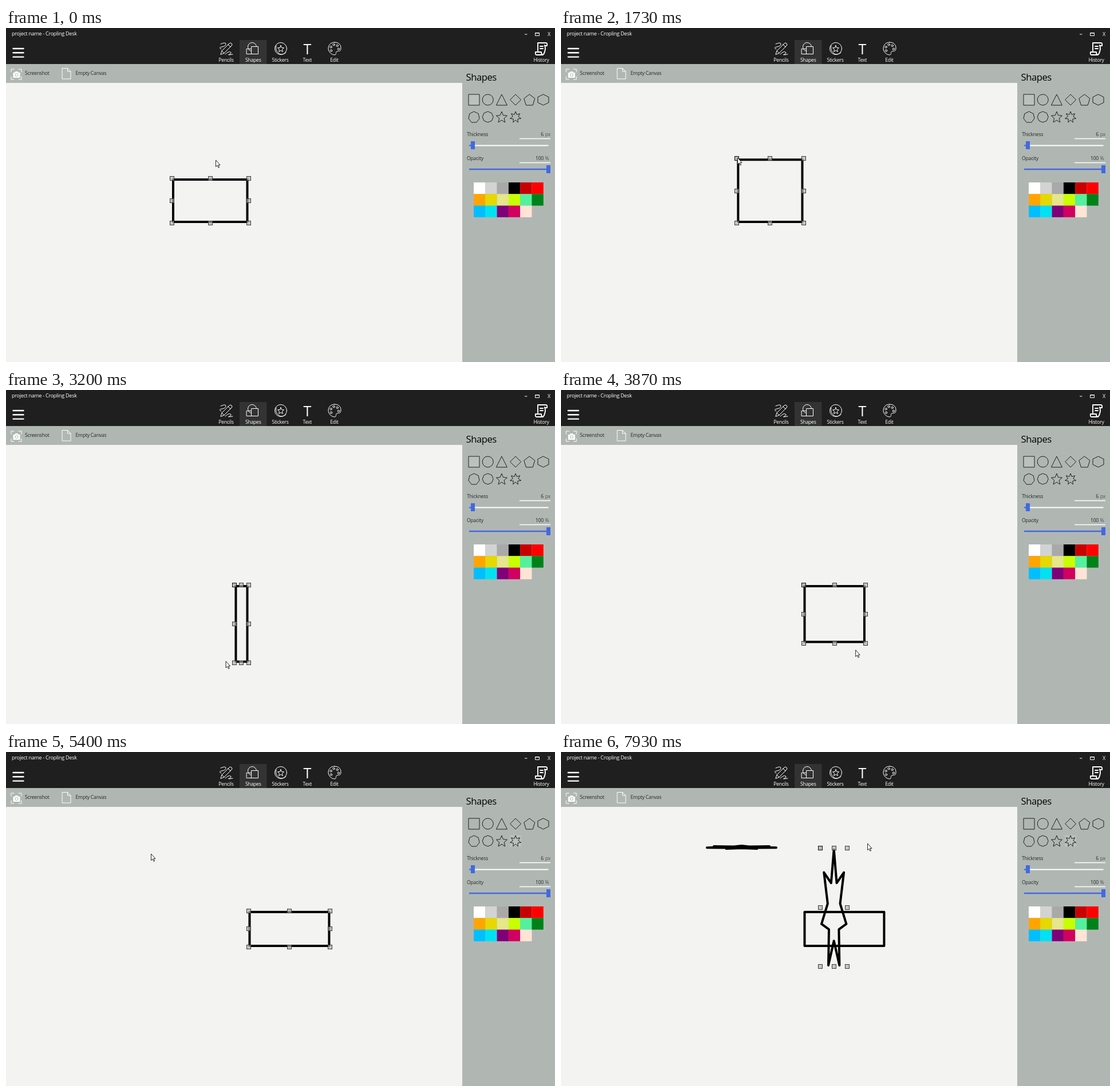
These frames come from a looping animation (959x584 px, 8 s). An HTML page:

```html
<!DOCTYPE html>
<html lang="en">
<head>
<meta charset="utf-8">
<title>Shapes</title>
<style>
  html, body { margin: 0; width: 100%; height: 100%; overflow: hidden; background: #f3f3f2; }
  svg { display: block; }
  text { font-family: "Open Sans", "Noto Sans", sans-serif; font-size: 8.7px; letter-spacing: -.03em; fill: #262a28; }
  .light text { fill: #fff; }
  .line { fill: none; stroke: #fff; stroke-width: 1; stroke-linejoin: round; stroke-linecap: round; }
  .tool { fill: none; stroke: #1d1f1e; stroke-width: 1; }
  .ink { fill: none; stroke: #000; stroke-width: 4; stroke-linejoin: round; }
  .handle { fill: #b4b4b4; fill-opacity: .7; stroke: #3c3c3c; stroke-width: 1; }
  .handle.hot { fill: #a0a0a0; stroke: #111; }
</style>
</head>
<body>
<svg width="959" height="584" viewBox="0 0 959 584">
  <path d="M0 63H959V584H797V96H0z" fill="#b0b7b3"/>
  <rect width="959" height="63" fill="#1f1f1f"/>
  <rect x="408" y="21" width="47.500" height="42" fill="#333"/>

  <g class="light">
    <text x="10" y="13" style="font-size:9px">project name - Cropling Desk</text>
    <text x="946" y="14" style="font-size:9px">X</text>
    <text x="519.500" y="45.500" style="font-size:25px">T</text>
    <g id="tabs" text-anchor="middle"></g>
  </g>
  <g id="icons" class="line">
    <path d="M12.500 36H30.500m-18 7.300h18m-18 7.300h18" stroke-width="2.400"/>
    <path d="M906.500 11H910M925 8.500H931.500V13.500H925zM925 9H931.500"/>
    <path d="M375 46l2-6 13-13q2-2 4 0t0 4l-13 13zM377 40l4 4M388 29l4 4M375 28q9-4 9 0t-7 5-1 4M383 46q6-6 9-4t-2 4 6 0"/>
    <circle cx="430" cy="33" r="7.500"/>
    <path d="M420.500 36.500H432V45.500H420.500z"/>
    <path d="M429 32.500H440.500V45.500H429z" fill="#333"/>
    <circle cx="480" cy="36" r="10.500"/>
    <path d="M472 31q-2 8 4 13t13-1"/>
    <path d="M574 25c-8 0-11 6-11 11s5 11 11 11c4 0 1-5 4-6s7 1 7-6-5-10-11-10z"/>
    <path d="M929 26h14q3 0 2 5h-4M929 26v14M941 30q2 6 0 11-1 6-5 6h-9q-3 0-2-5h10q0 5 3 5M933 32h5M933 36h5" stroke-width="1.900"/>
    <path d="M9 77V72H14M22 72H27V77M27 85V90H22M14 90H9V85M98.500 70.500H107.500L113 76V89H98.500zM107.500 70.500V76H113"/>
  </g>
  <path d="M12.500 78H15L16.500 76H20.500L22 78H24.500V87H12.500z" fill="#fff"/>
  <circle cx="18.500" cy="82" r="2.500" fill="none" stroke="#b0b7b3"/>

  <text x="33" y="82">Screenshot</text>
  <text x="121.500" y="82">Empty Canvas</text>
  <text x="803.500" y="91.500" style="font-size:16.700px;fill:#000">Shapes</text>
  <text x="805" y="188.500">Thickness</text>
  <text x="805" y="230.500">Opacity</text>
  <g text-anchor="end">
    <text x="939" y="188.500">6</text>
    <text x="951" y="188.500" style="fill:#555">px</text>
    <text x="939" y="230.500">100</text>
    <text x="948.500" y="230.500" style="fill:#555">%</text>
  </g>
  <path d="M897 193.500H951M897 235.500H951" stroke="#fff" stroke-width="1.300"/>
  <path d="M809 205.500H947.500" stroke="#fff" stroke-width="2"/>
  <path d="M809 205.500H813M809 247H946" stroke="#4169e1" stroke-width="2.400"/>
  <path d="M812 198H819V212H812zM944 240H951V254H944z" fill="#4169e1"/>

  <rect id="glow" width="20" height="20" fill="#fff" fill-opacity=".14"/>
  <g id="tools" class="tool"></g>
  <g id="swatches"></g>

  <path id="box" class="ink"/>
  <path id="star" class="ink"/>
  <path id="flat" class="ink"/>
  <g id="handles"></g>
  <path id="cursor" d="M.5 0V11.500L3.200 9.200L5 13.200L6.600 12.500L4.900 8.500H8z" fill="#fff" stroke="#111" stroke-width=".9"/>
</svg>
<script>
const $ = id => document.getElementById(id);
const add = (id, name, attrs) => {
  const el = document.createElementNS('http://www.w3.org/2000/svg', name);
  for (const k in attrs) el.setAttribute(k, attrs[k]);
  return $(id).appendChild(el);
};

// Regular polygon, or a star when inner < 1, stretched to fill a box.
function polygon(n, inner, [x0, y0, x1, y1]) {
  const count = inner < 1 ? 2 * n : n;
  const pts = Array.from({ length: count }, (_, i) => {
    const a = 2 * Math.PI * i / count, r = i % 2 ? inner : 1;
    return [r * Math.sin(a), -r * Math.cos(a)];
  });
  const xs = pts.map(p => p[0]), ys = pts.map(p => p[1]);
  const fit = (v, all, a, b) => {
    const lo = Math.min(...all);
    return (a + (v - lo) / (Math.max(...all) - lo) * (b - a)).toFixed(2);
  };
  return 'M' + pts.map(([x, y]) => fit(x, xs, x0, x1) + ' ' + fit(y, ys, y0, y1)).join('L') + 'z';
}
const rectPath = ([x0, y0, x1, y1]) => `M${x0} ${y0}H${x1}V${y1}H${x0}z`;

// Tabs, small icons and side panel
['Pencils', 'Shapes', 'Stickers', 'Text', 'Edit', 'History'].forEach((name, i) => {
  add('tabs', 'text', { x: i < 5 ? 384.5 + 47.25 * i : 935, y: 59 }).textContent = name;
});
add('icons', 'path', { d: polygon(5, .45, [474.5, 30.5, 485.5, 41.5]) });
for (let i = 0; i < 5; i++) {
  const a = 2.6 + i * .95;
  add('icons', 'circle', { cx: 574 + 7 * Math.cos(a), cy: 36 + 7 * Math.sin(a), r: 1.7 });
}
const slot = i => [808 + i % 6 * 24.2, 116 + Math.floor(i / 6) * 30];
const cell = i => {
  const [x, y] = slot(i);
  return [x, y, x + 19, y + 19];
};
const tool = d => add('tools', 'path', { d });
tool(rectPath(cell(0)));
add('tools', 'circle', { cx: 841.7, cy: 125.5, r: 9.5 });
for (let n = 3; n < 9; n++) tool(polygon(n, 1, cell(n - 1)));
tool(polygon(5, .45, cell(8)));
tool(polygon(7, .5, cell(9)));

const colors = 'white lightgray darkgray black #c80000 red orange #e6d800 #e6e68a #c8ff00 ' +
  '#54f09e #008219 deepskyblue #00e1f2 #800078 #d2005f #ffe4d6';
colors.split(' ').forEach((fill, i) => add('swatches', 'rect', {
  x: 817 + i % 6 * 20.3, y: 270 + Math.floor(i / 6) * 20.3, width: 20.3, height: 20.3, fill
}));
const handles = Array.from({ length: 8 }, () =>
  add('handles', 'rect', { class: 'handle', width: 7, height: 7 }));

// Pointer moves: begin, end, then where it comes to rest.
const moves = [
  [0, 333, 297, 274], [467, 867, 290, 263], [1230, 2000, 315, 213], [2067, 2452, 437, 204],
  [4360, 4667, 868, 148], [4667, 4850, 892, 154], [4850, 5400, 253, 178],
  [5400, 5533, 453, 374], [5600, 6400, 253, 173], [6400, 6533, 263, 170],
  [6533, 6667, 378, 162], [6870, 7333, 253, 173], [7400, 7885, 380, 198], [7885, 7933, 535, 160]
];
const ORBIT = 2452, RELEASE = 4340, LAG = 15;
const anchor = [423.5, 341];

// Speeding up clockwise round the fixed corner of the rectangle.
function orbit(t) {
  const u = (Math.min(t, RELEASE) - ORBIT) / (RELEASE - ORBIT);
  const a = (-85.4 + 778 * u ** 1.524) * Math.PI / 180;
  return [anchor[0] + 161 * Math.cos(a), anchor[1] + 137.5 * Math.sin(a)];
}
function pointer(t) {
  let pos = [366, 231];
  for (const [begin, end, x, y] of moves) {
    if (t > ORBIT && begin > ORBIT && begin < 4400) pos = orbit(t);
    if (t <= begin) break;
    const u = Math.min(1, (t - begin) / (end - begin)), h = u * u * (3 - 2 * u);
    pos = [pos[0] + (x - pos[0]) * h, pos[1] + (y - pos[1]) * h];
  }
  return pos;
}

const clamp = (v, lo, hi) => Math.min(hi, Math.max(lo, v));
const span = ([ax, ay], [bx, by]) =>
  [Math.min(ax, bx), Math.min(ay, by), Math.max(ax, bx), Math.max(ay, by)];
const inset = ([x0, y0, x1, y1]) => {
  const dx = Math.min(2, (x1 - x0) / 2), dy = Math.min(2, (y1 - y0) / 2);
  return [x0 + dx, y0 + dy, x1 - dx, y1 - dy];
};
const show = (id, on) => { $(id).style.display = on ? '' : 'none'; };

function draw(t) {
  const tip = pointer(t);
  $('cursor').setAttribute('transform', `translate(${tip[0].toFixed(2)} ${tip[1].toFixed(2)})`);
  const [gx, gy] = slot(t < 4720 ? 0 : 9);
  $('glow').setAttribute('x', gx - .5);
  $('glow').setAttribute('y', gy - .5);

  const box = span(pointer(clamp(t - LAG, 1200, RELEASE)), anchor);
  $('box').setAttribute('d', rectPath(inset(box)));

  const near = t < 7440 ? [253, 176] : pointer(t - LAG);
  const star = span(near, t < 5520 ? tip : [453, 375]);
  show('star', t > 5420);
  $('star').setAttribute('d', polygon(7, .5, inset(star)));

  const [fx, fy] = pointer(Math.min(t, 7333));
  show('flat', t > 6900);
  $('flat').setAttribute('d', polygon(7, .5, inset(span([378, 162], [fx, Math.min(171, fy)]))));

  const [x0, y0, x1, y1] = t < 5580 ? box : star;
  const xs = [x0, (x0 + x1) / 2, x1], ys = [y0, (y0 + y1) / 2, y1];
  handles.forEach((el, i) => {
    const k = i < 4 ? i : i + 1;
    el.setAttribute('x', Math.floor(xs[k % 3] - 3.5) + .5);
    el.setAttribute('y', Math.floor(ys[Math.floor(k / 3)] - 3.5) + .5);
  });
  const hot = t > 800 && t < 4360 || t > 6350 && t < 6440 || t > 7300;
  handles[0].classList.toggle('hot', hot);
}

// The screen updates 15 times a second.
const LOOP = 8000, STEP = 200 / 3, start = performance.now();
function tick() {
  const t = (performance.now() - start) % LOOP;
  draw(Math.floor((t + 4) / STEP) * STEP % LOOP);
  requestAnimationFrame(tick);
}
tick();
</script>
</body>
</html>
```
